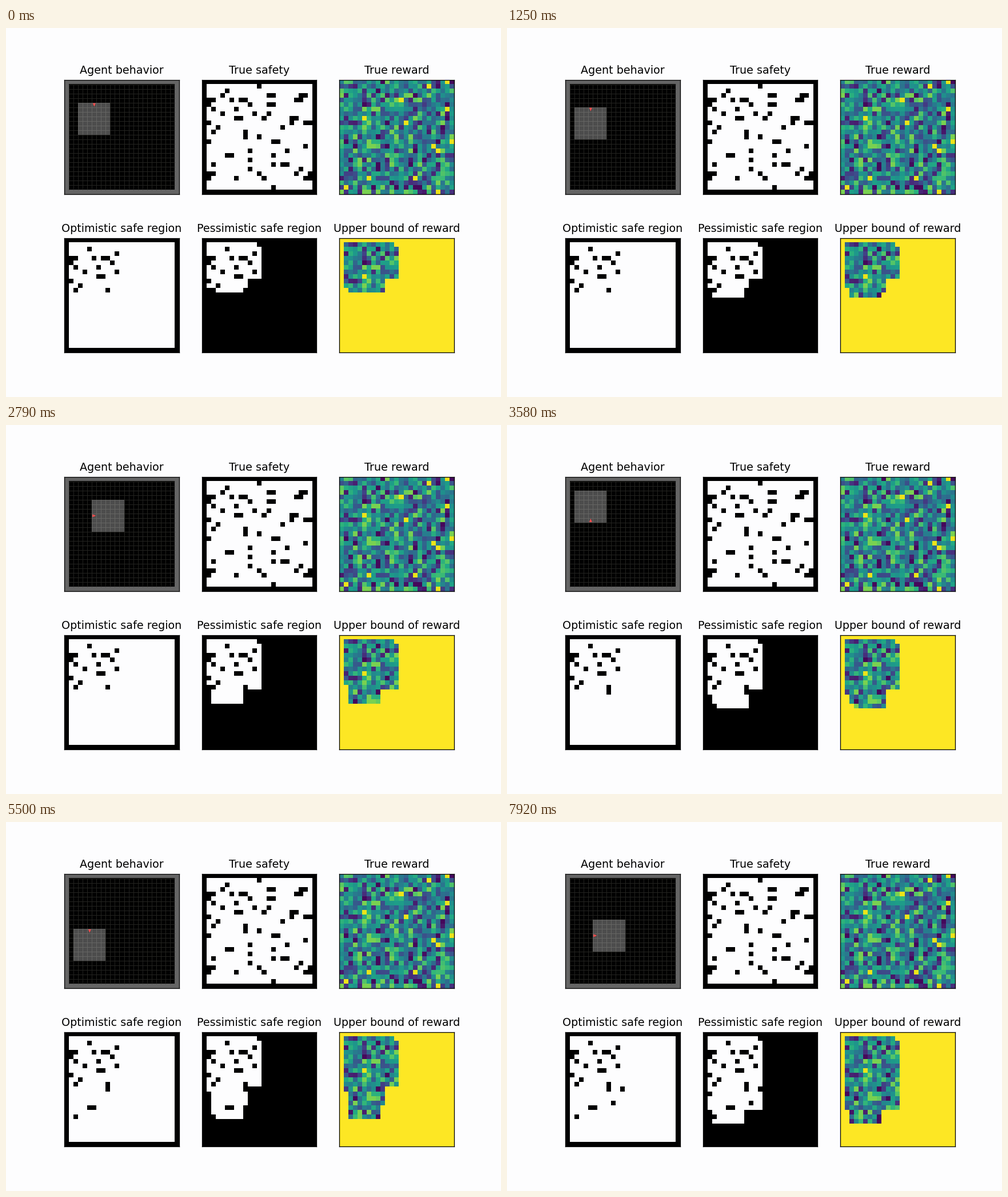
A matplotlib script that plays this animation: 866 by 646 pixels, repeating every 8 s.

```python
import random

import matplotlib.pyplot as plt
import numpy as np
from matplotlib.animation import FuncAnimation
from matplotlib.patches import Polygon, Rectangle

W, H, DPI = 866, 646, 100
N, VIEW = 25, 7
FRAMES, LOOP_MS = 192, 8000
PAPER = "#fdfdfe"
STEP = [(1, 0), (0, 1), (-1, 0), (0, -1)]  # right, down, left, up

UNSAFE = {
    1: [12], 2: [5], 3: [4, 14, 15, 21, 22], 4: [1, 2, 6, 8, 9, 20, 21],
    5: [1, 10, 14, 15], 6: [2, 7], 7: [4, 11, 14], 8: [7, 8, 13, 19, 20],
    9: [1, 19, 22, 23], 10: [3, 17], 11: [2, 9], 12: [9, 12],
    13: [1, 15, 16], 14: [22], 15: [10, 18], 16: [5, 6, 15], 17: [10],
    18: [2, 15, 17, 18], 19: [10, 21], 20: [1, 2, 12, 20, 23],
    21: [1, 7, 13, 22, 23], 23: [15],
}
BEST = [(0, 23), (1, 19), (4, 13), (6, 23), (8, 5), (9, 14), (13, 24),
        (14, 20), (15, 21), (21, 6), (21, 16), (23, 1), (24, 21)]

# (frame, pose) with pose = column, row, heading
STOPS = [(30, (5, 6, 1)), (48, (5, 8, 1)), (67, (6, 8, 0)), (78, (6, 9, 1)),
         (88, (5, 9, 2)), (101, (5, 10, 1)), (132, (5, 12, 1)),
         (133, (5, 12, 1)), (150, (5, 13, 1)), (166, (4, 13, 2)),
         (190, (6, 13, 0)), (191, (6, 13, 0))]
START = (6, 5, 1)


def view_corner(pose):
    c, r, d = pose
    return [(c, r - 3), (c - 3, r), (c - 6, r - 3), (c - 3, r - 6)][d]


def view_mask(pose):
    x, y = view_corner(pose)
    mask = np.zeros((N, N), bool)
    mask[max(y, 1):min(y + VIEW, N - 1), max(x, 1):min(x + VIEW, N - 1)] = True
    return mask


def moves(pose):
    c, r, d = pose
    dx, dy = STEP[d]
    return [(c + dx, r + dy, d), (c, r, (d + 1) % 4), (c, r, (d - 1) % 4), pose]


def wander(start, goal, steps, blocked, allowed):
    """Random walk that reaches goal in exactly the given number of steps."""
    poses = {(c, r, d) for c in range(N) for r in range(N) for d in range(4)
             if not blocked[r, c] and not (view_mask((c, r, d)) & ~allowed).any()}
    following = {p: [q for q in moves(p) if q in poses] for p in poses}
    reach = [{goal}]
    for _ in range(steps - 1):
        reach.append({p for p in poses if any(q in reach[-1] for q in following[p])})
    path, pose = [], start
    for targets in reversed(reach):
        options = [q for q in following[pose] if q in targets]
        pose = random.choice([q for q in options if q != pose] or options)
        path.append(pose)
    return path


random.seed(4)
rng = np.random.default_rng(11)

wall = np.ones((N, N), bool)
wall[1:-1, 1:-1] = False
unsafe = wall.copy()
for row, cols in UNSAFE.items():
    unsafe[row, cols] = True
estimate = unsafe.copy()
estimate[3, 4], estimate[3, 11] = False, True
hazards = estimate & ~wall
hazards[13, 1] = False

reward = np.clip(rng.normal(0.43, 0.23, (N, N)), 0.02, 0.8)
for cell in BEST:
    reward[cell] = 0.97

seen = np.zeros((N, N), bool)
seen[1, 1:12] = seen[2:9, 1:13] = seen[9:11, 1:10] = seen[11, 2:10] = True

poses, known = [START], [seen]
for frame, goal in STOPS:
    allowed = known[-1] | view_mask(goal)
    for pose in wander(poses[-1], goal, frame - len(poses) + 1,
                       unsafe | estimate, allowed):
        poses.append(pose)
        known.append(known[-1] | view_mask(pose))

fig = plt.figure(figsize=(W / DPI, H / DPI), dpi=DPI, facecolor=PAPER)
white = np.array([253, 253, 254]) / 255


def safe_rgb(dark):
    return np.where(dark[..., None], 0.0, white)


def panel(col, row, title, rgb):
    left, top, size = 102.2 + 240.6 * col, 90.6 + 277.1 * row, 200.6
    ax = fig.add_axes([left / W, 1 - (top + size) / H, size / W, size / H])
    image = ax.imshow(rgb, extent=(0, N, N, 0), interpolation="nearest",
                      aspect="auto")
    ax.set(xticks=[], yticks=[])
    for spine in ax.spines.values():
        spine.set_linewidth(0.92)
    fig.text((left + size / 2) / W, 1 - (top - 11) / H, title, ha="center",
             va="baseline", family="DejaVu Sans", size=13.8)
    return ax, image


def optimistic(known_cells):
    return safe_rgb(wall | (hazards & known_cells))


def pessimistic(known_cells):
    return safe_rgb(estimate | ~known_cells)


def upper_bound(known_cells):
    return plt.cm.viridis(np.where(known_cells, reward, 1.0))


world = np.where(wall[..., None], 100 / 255, 0.0) * np.ones(3)
agent_ax, _ = panel(0, 0, "Agent behavior", world)
panel(1, 0, "True safety", safe_rgb(unsafe))
panel(2, 0, "True reward", plt.cm.viridis(reward))
live = [(panel(i, 1, title, make(seen))[1], make) for i, (title, make) in enumerate([
    ("Optimistic safe region", optimistic),
    ("Pessimistic safe region", pessimistic),
    ("Upper bound of reward", upper_bound)])]

ticks = np.arange(1, N - 1)
agent_ax.hlines(ticks, 1, N - 1, color="#232320", lw=0.72)
agent_ax.vlines(ticks, 1, N - 1, color="#232320", lw=0.72)
agent = agent_ax.add_patch(Polygon([(0, 0), (1, 0), (0, 1)], fc="red", lw=0, zorder=3))
light = agent_ax.add_patch(Rectangle((0, 0), VIEW, VIEW, fc="white", alpha=0.3,
                                     lw=0, zorder=4))
agent_ax.set(xlim=(0, N), ylim=(N, 0))
ARROW = np.array([(-0.38, -0.31), (0.37, 0), (-0.38, 0.31)])


def update(frame):
    c, r, d = poses[frame]
    dx, dy = STEP[d]
    agent.set_xy(ARROW @ np.array([(dx, dy), (-dy, dx)]) + (c + 0.5, r + 0.5))
    light.set_xy(view_corner(poses[frame]))
    for image, make in live:
        image.set_data(make(known[frame]))
    return [agent, light] + [image for image, _ in live]


anim = FuncAnimation(fig, update, frames=FRAMES, interval=LOOP_MS / FRAMES,
                     repeat=True, repeat_delay=0)
plt.show()
```
